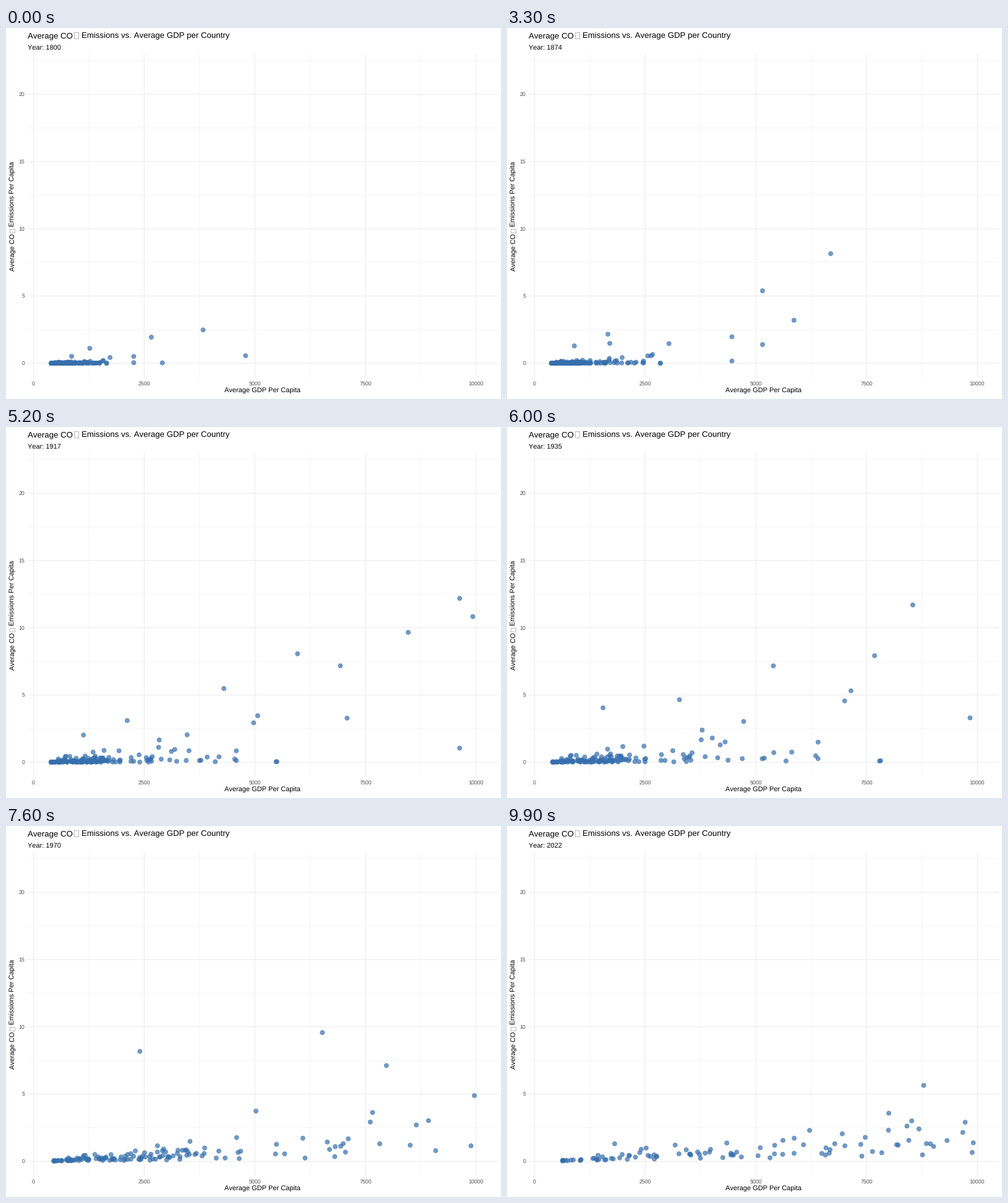
Recreate the animation shown at these times as a matplotlib script. Size 800 by 600 pixels, loop 10000 ms.

```python
import numpy as np
import matplotlib.pyplot as plt
from matplotlib.animation import FuncAnimation
from matplotlib.patches import Rectangle

plt.rcParams["font.family"] = ["Liberation Sans"]
plt.rcParams["text.hinting"] = "no_hinting"
plt.rcParams["text.kerning_factor"] = 6  # effectively no kerning

W, H, PT = 800, 600, 0.72
FRAMES, INTERVAL = 100, 100
FIRST, LAST = 1800, 2022
LEFT, RIGHT, TOP, BOTTOM = 35.3, 794.5, 42, 566
X0, Y0, KX, KY = 44.5, 542.2, 71.55, 21.75  # pixel origin, pixels per unit
MAX_GDP = 10                                # thousands
CROWD = 155
DOT_SIZE = (7.1 * PT) ** 2
BLUE = (54 / 255, 111 / 255, 173 / 255, 0.7)

# Standout countries: (year, GDP in thousands, CO2 per capita)
STANDOUTS = [
    [(1800, 3.83, 2.48), (1831, 4.06, 2.70), (1874, 6.69, 8.15), (1917, 8.48, 9.67)],
    [(1800, 4.79, .56), (1831, 3.74, .72), (1874, 5.15, 1.39), (1917, 7.10, 3.30)],
    [(1800, 2.66, 1.94), (1831, 2.86, 1.18), (1874, 5.15, 5.39), (1952, 8.41, 8.65)],
    [(1800, 1.27, 1.11), (1874, 1.70, 1.48), (1952, 6.46, 8.81), (1988, 9.41, 5.50)],
    [(1800, 2.91, .03), (1831, 2.87, .01), (1874, 5.86, 3.20), (1917, 9.96, 10.90)],
    [(1800, .86, .52), (1917, 2.12, 3.11), (1952, 4.42, 6.19), (1988, 8.53, 12.79)],
    [(1800, .50, .02), (1917, 1.13, 2.03), (1988, 2.82, 10.19), (2022, 1.81, 1.30)],
    [(1800, .90, .02), (1917, 3.52, .86), (1988, 5.52, 4.68), (2022, 8.79, 5.64)],
]

rng = np.random.default_rng(7)
wealth = np.clip(rng.normal(size=CROWD), -2, 2)
carbon = np.clip(rng.normal(size=CROWD), -2, 2)


def smooth(t, start, end):
    u = np.clip((t - start) / (end - start), 0, 1)
    return u * u * (3 - 2 * u)


def crowd(t):
    """Lognormal incomes that grow and spread; emissions follow income."""
    gdp = .25 + np.exp(-.6 + 2.75 * t ** 2 + (.65 + .9 * t ** 1.3) * wealth)
    level = .015 + .1 * smooth(t, .2, .85)
    spread = 1.35 - .75 * smooth(t, .5, .85)
    return np.column_stack([gdp, level * gdp ** 1.2 * np.exp(spread * carbon)])


def standout(path, year):
    years, gdp, co2 = map(list, zip(*path))
    if years[-1] < LAST:  # keeps growing until it leaves the scale
        years.append(years[-1] + 25)
        gdp.append(1.1 * MAX_GDP)
        co2.append(co2[-1])
    return np.interp(year, years, gdp), np.interp(year, years, co2)


def positions(t):
    year = FIRST + t * (LAST - FIRST)
    xy = np.vstack([crowd(t), [standout(p, year) for p in STANDOUTS]])
    return xy[xy[:, 0] <= MAX_GDP]


fig = plt.figure(figsize=(8, 6), dpi=100, facecolor="white")
ax = fig.add_axes([LEFT / W, 1 - BOTTOM / H, (RIGHT - LEFT) / W, (BOTTOM - TOP) / H])
ax.set_xlim((LEFT - X0) / KX, (RIGHT - X0) / KX)
ax.set_ylim((Y0 - BOTTOM) / KY, (Y0 - TOP) / KY)
ax.axis("off")


def label(x, y, text, px, color="black", **kw):
    return fig.text(x / W, 1 - y / H, text, size=px * PT, color=color,
                    va="baseline", rotation_mode="anchor", **kw)


def missing_glyph(x, y, w, h):
    fig.add_artist(Rectangle((x / W, 1 - (y + h) / H), w / W, h / H, fill=False,
                             ec="#8c8c8c", lw=.6 * PT, transform=fig.transFigure))


def gridlines(xs, ys, px, z):
    style = dict(color="#ebebeb", lw=px * PT, zorder=z, snap=False)
    for x in xs:
        ax.axvline(x, **style)
    for y in ys:
        ax.axhline(y, **style)


x_ticks, y_ticks = np.arange(0, 10.1, 2.5), np.arange(0, 21, 5)
gridlines(x_ticks[:-1] + 1.25, np.arange(2.5, 23, 5), .53, 0)
gridlines(x_ticks, y_ticks, 1.07, 1)
for v in x_ticks:
    label(X0 + KX * v, 578, f"{1000 * v:.0f}", 8.8, "#4d4d4d", ha="center")
for v in y_ticks:
    label(30.2, Y0 - KY * v + 2.8, f"{v}", 8.8, "#4d4d4d", ha="right")

label(LEFT, 16, "Average CO", 13.2)
missing_glyph(109.5, 7.5, 7, 9)
label(121.6, 16, "Emissions vs. Average GDP per Country", 13.2)
year_text = label(LEFT, 35, "", 11)
label((LEFT + RIGHT) / 2, 590, "Average GDP Per Capita", 11, ha="center")
label(13.6, 393, "Average CO", 11, rotation=90)
missing_glyph(6, 325, 7.5, 6)
label(13.6, 321.3, "Emissions Per Capita", 11, rotation=90)

dots = ax.scatter([], [], color=[BLUE], lw=.71 * PT, zorder=3)


def update(frame):
    t = frame / (FRAMES - 1)
    xy = positions(t)
    dots.set_offsets(xy)
    # one size per dot keeps positions from snapping to whole pixels
    dots.set_sizes(np.full(len(xy), DOT_SIZE), dpi=fig.dpi)
    year_text.set_text(f"Year: {round(FIRST + t * (LAST - FIRST))}")
    return dots, year_text


anim = FuncAnimation(fig, update, frames=FRAMES, interval=INTERVAL,
                     repeat=True, repeat_delay=0, blit=False)
plt.show()
```
